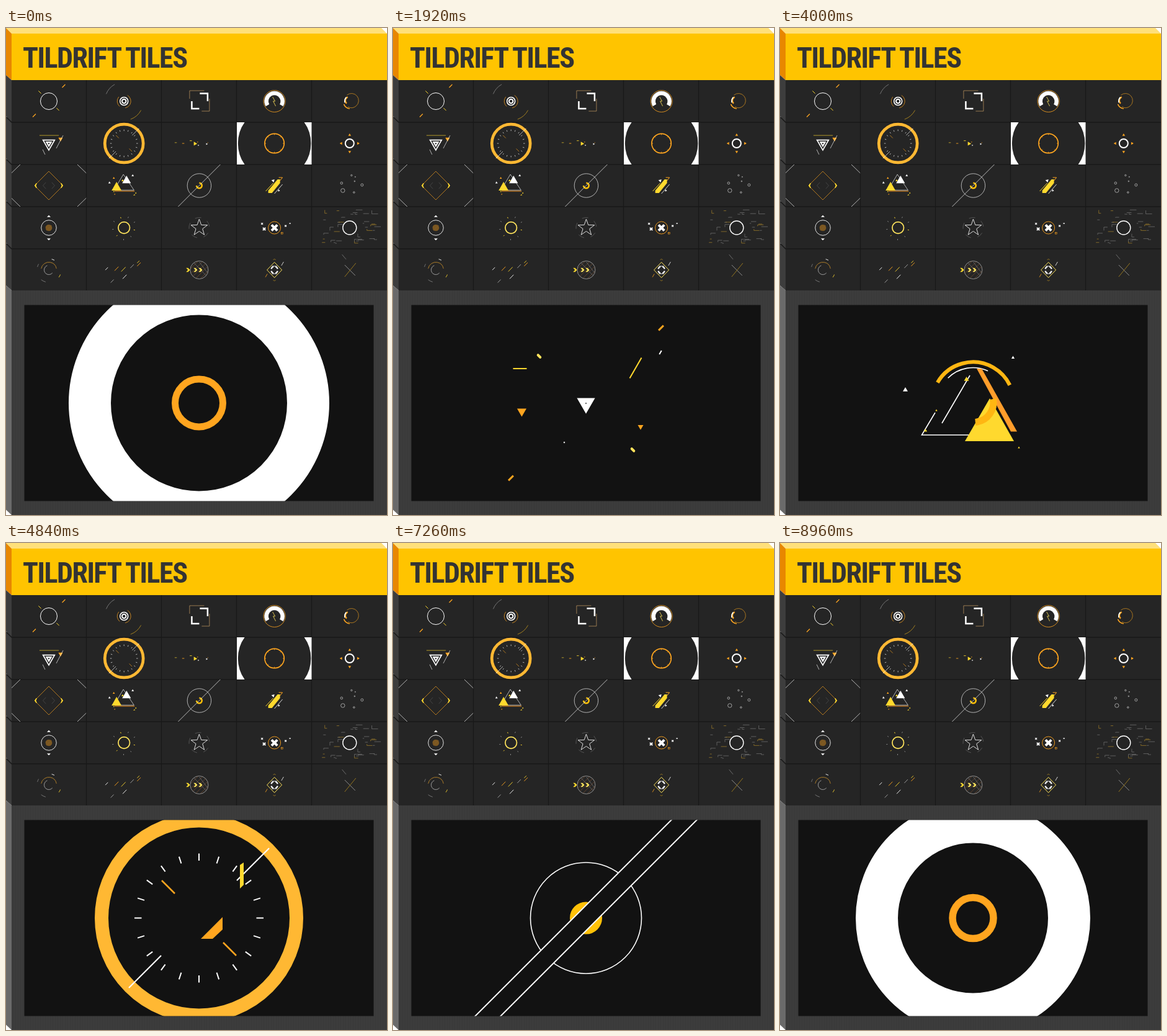
An HTML page with a canvas for the animation above (8.98 s loop, 614x785 px).

```html
<!DOCTYPE html>
<html lang="en">
<head>
<meta charset="utf-8">
<title>Tildrift Tiles</title>
<style>
html, body { margin: 0; width: 100%; height: 100%; overflow: hidden; background: #fff; }
canvas { position: absolute; left: 0; top: 0; display: block; }
h1 {
  position: absolute; left: 27px; top: 25px; margin: 0; color: #333; white-space: nowrap;
  font: 700 46px/46px "Roboto Condensed", Roboto, "Open Sans", sans-serif;
  font-stretch: 75%; letter-spacing: -1.5px;
}
</style>
</head>
<body>
<canvas id="stage" width="614" height="785"></canvas>
<h1>TILDRIFT TILES</h1>
<script>
const LOOP = 8980, MINI = 0.215;
const W = '#fff', Y = '#ffd92e', O = '#ffa51f', AMBER = '#ffb833', PALE = '#ffe45c', GREY = '#8a8a8a';
const PANEL = '#121212', CELL = '#252525';
const view = document.getElementById('stage').getContext('2d');
let g = view, bg = PANEL, thin = 0;

// timing
const prog = (t, a, b) => Math.min(1, Math.max(0, (t - a) / (b - a)));
const out = x => 1 - (1 - x) ** 3;
const soft = x => x * x * (3 - 2 * x);
const lerp = (a, b, p) => a + (b - a) * p;
const mix = (a, b, p) => a.map((v, i) => lerp(v, b[i], p));
const rad = d => d * Math.PI / 180;

// shapes
function trace(pts) {
  g.beginPath();
  for (let i = 0; i < pts.length; i += 2) g.lineTo(pts[i], pts[i + 1]);
}
function line(col, w, ...pts) {
  if (w <= 0) return;
  g.strokeStyle = col; g.lineWidth = Math.max(w, thin);
  trace(pts); g.stroke();
}
function poly(col, ...pts) {
  g.fillStyle = col;
  trace(pts); g.fill();
}
function arc(col, w, r, a = 0, b = 360, x = 0, y = 0) {
  if (r <= 0 || w <= 0 || b <= a) return;
  g.strokeStyle = col; g.lineWidth = Math.max(w, thin);
  g.beginPath(); g.arc(x, y, r, rad(a), rad(b)); g.stroke();
}
function tri(col, x, y, r, dir = -90) {
  const pts = [];
  for (let i = 0; i < 3; i++) {
    const a = rad(dir + i * 120);
    pts.push(x + r * Math.cos(a), y + r * Math.sin(a));
  }
  poly(col, ...pts);
}
function dash(col, w, x, y, len, deg = 0) {
  const dx = Math.cos(rad(deg)) * len / 2, dy = Math.sin(rad(deg)) * len / 2;
  line(col, w, x - dx, y - dy, x + dx, y + dy);
}
function tick(col, w, deg, r0, r1) {
  const c = Math.cos(rad(deg)), s = Math.sin(rad(deg));
  line(col, w, c * r0, s * r0, c * r1, s * r1);
}
function hatch(col, r, w, step) {
  if (r <= 0 || w <= 0) return;
  g.save();
  g.beginPath(); g.arc(0, 0, r, 0, 7); g.clip();
  const n = Math.ceil(2 * r / step);
  for (let i = -n; i <= n; i++) line(col, w, i * step - r, r, i * step + r, -r);
  g.restore();
}
function scaled(k, fn) {
  if (k <= 0) return;
  g.save(); g.scale(k, k); fn(); g.restore();
}

// scenes, drawn round their middle
function rings(t) {
  const u = t > 5000 ? t - LOOP : t;
  const R = 210 + 1.05 * u;
  if (R > 0 && R < 400) {
    const w = Math.min(68, R);
    arc(W, w, R - w / 2);
  }
  let r = u < 150 ? 38.5 + 0.275 * u : 79.75 + 25 * (1 - Math.exp(-0.011 * (u - 150)));
  const k = 1 - prog(u, 1250, 1700) ** 2, w = Math.max(4, 11 - 0.025 * u) * k;
  r *= k;
  arc(O, w, r);
  const len = 10 * prog(u, 40, 120) * k;
  for (let i = 0; i < 8; i++) tick(O, 4 * k, i * 45 + prog(u, 200, 1400) * 90, r - len, r);
}

const sparks = [
  [O, 3, 121, -121, 11, -45], [O, 3, -121, 121, 11, -45], [W, 2, 120, -81.5, 7, -60],
  [Y, 2, 80, -56.5, 38, -60], [Y, 2, -106.5, -55.5, 22, 0], [W, 2, -35, 63.5, 2, 45],
  [PALE, 4, -75.5, -75.5, 5, 45], [PALE, 4, 75.5, 75.5, 5, 45]
];
function target(t) {
  const far = out(prog(t, 1780, 1920)) + 0.1 * out(prog(t, 1920, 2300));
  const size = 1 - prog(t, 2000, 2450);
  for (const [col, w, x, y, len, deg] of sparks) {
    g.lineCap = w > 3 ? 'round' : 'butt';
    dash(col, w * Math.min(1, size * 3), x * far, y * far, len * size, deg);
  }
  g.lineCap = 'butt';
  tri(O, -103.5 * far, 13.3 * far, 8.7 * size, 90);
  const grow = soft(prog(t, 2050, 2450)), k = 1 - prog(t, 3050, 3450) ** 2;
  tri(O, lerp(88 * far, 88, grow), lerp(38 * far, -33, grow), lerp(5.2, 19, grow) * k, 90);
  const R = 58 * out(prog(t, 1874, 2300)) * k;
  tri(W, 0, 0.5, R, 90);
  tri(bg, 0, 0.5, 42 * out(prog(t, 1915, 2350)) * k, 90);
  tri(W, 0, 0.5, 29 * out(prog(t, 2120, 2480)) * k, 90);
  tri(bg, 0, 0.5, 9 * prog(t, 2300, 2600) * k, 90);
  const p = out(prog(t, 2200, 2600)) - soft(prog(t, 2900, 3350));
  if (p > 0) {
    line(Y, 2, -70, -60, -70 + 145 * p, -60);
    line(W, 2, 107, -60, 107 - 51 * p, -60 + 97 * p);
    line(W, 2, -46, 46, -46 + 18 * p, 46 + 38 * p);
  }
}

const chips = [[W, -109, -21, 4.6], [W, 64.5, -73, 3], [Y, -10.5, -38, 4.6],
  [Y, -76.5, 44.5, 3], [Y, -59, 12, 2], [Y, 74, 72, 2]];
function peaks(t) {
  const p = soft(prog(t, 4040, 4330)), q = 1 - p;
  const k = out(prog(t, 3560, 3950)) * (1 - prog(t, 4450, 4620) ** 2);
  scaled(k, () => {
    arc('#ffb612', 6, 66, -150, -150 + 124 * q);
    arc(W, 1.6, 57, -135, -135 + 70 * q);
    line(W, 1.6, ...mix([-61, 15.5, -82.5, 51.5, -7, 51.5], [-5, -84, -75, 34, 75, 34], p));
    line(W, 1.6, ...mix([-5, -44.5, -50, 32.5], [-5, -84, 75, 34], p));
    poly('#ff9d2b', ...mix([6, -55.5, 14, -55.5, 71, 46, 61, 46], [-70, 44, -70, 40, 79, 40, 79, 44], p));
    poly(Y, ...mix([-13, 61.5, 66, 61.5, 27, -7.5], [-93, 37, -19, 37, -56, -28], p));
    arc('#ffb612', 11, 32, -10, -10 + 95 * q, 1, -1);
    tri(W, 19, -36, 38 * p);
    for (const [col, x, y, r] of chips) tri(col, x, y, r * (1 + 1.2 * p));
  });
}

function dial(t) {
  const leave = prog(t, 5130, 5400), k = 1 - leave;
  const r = 157 * out(prog(t, 4620, 4840)) - 13 * soft(prog(t, 4840, 4960));
  arc(AMBER, 22, r + 340 * leave ** 2);
  const p = out(prog(t, 4680, 4820)) * k;
  for (let i = 0; i < 20; i++) tick(W, 2 * Math.min(1, p * 2), i * 18, 104 - 11.5 * p, 104);
  for (const s of [1, -1]) {
    if (p <= 0) continue;
    line(W, 2.2, 113 * s, -112.5 * s, (113 - 52 * p) * s, (-112.5 + 52 * p) * s);
    line(O, 2.5, 39 * s, 39.5 * s, (39 + 21 * p) * s, (39.5 + 21 * p) * s);
  }
  const enter = prog(t, 4720, 4840), go = prog(t, 4840, 4940);
  if (enter > 0 && go < 1) {
    const slab = (col, pts) => {
      const end = pts.map((v, i) => i % 2 ? -80 : 80);
      poly(col, ...mix(pts.map(v => v * enter), end, go));
    };
    slab(Y, [66, -85.5, 72, -89.5, 72, -53.5, 66, -47.5]);
    slab(O, [38, -1.5, 38, 18.5, 22, 33.5, 3, 33.5]);
  }
}

function drift(t) {
  const p = out(prog(t, 5420, 5750)) * (1 - soft(prog(t, 5850, 6120)));
  const back = soft(prog(t, 5800, 6200)), fade = 1 - prog(t, 6200, 6280);
  dash(Y, 2 * fade, lerp(-176 * out(prog(t, 5420, 5750)), -38, back), -5.5, 16 * fade);
  if (p <= 0) return;
  dash(O, 4, -120 * p, 0, 16 * p);
  dash(Y, 4, -63 * p, -20 * p, 16 * p);
  tri(Y, -32 * p, 2, 17 * p, 0);
  tri(W, -6 * p, 14 * p, 6 * p, 0);
  tri(O, -12 * p, -10 * p, 5 * p, 0);
  tri(W, 56 * p, 5 * p, 8 * p, 0);
  dash(O, 4, 64 * p, -5 * p, 5 * p);
}

function arrows(t) {
  const p = out(prog(t, 6205, 6520));
  const k = out(prog(t, 6080, 6195)) * (1 - prog(t, 6750, 6960) ** 2);
  scaled(k, () => {
    arc(W, lerp(6, 4, p), lerp(26, 57, p));
    hatch(bg, lerp(26, 57, p) + 5, 3.4 * (1 - p), 11);
    hatch(O, 25 * out(prog(t, 6330, 6600)), 4, 10);
    const h = lerp(41.7, 14, p), b = lerp(20.7, 80, p);
    for (const s of [1, -1]) poly(W, -h, b * s, h, b * s, 0, (b + h) * s);
  });
}

function slash(t) {
  const k = out(prog(t, 6860, 7100)), fill = prog(t, 7150, 7250);
  arc(W, 1.6, 89.5 * k);
  const w = lerp(12, 26, fill);
  arc('#ffc107', w * k, (26 - w / 2) * k, -90, 180 + 90 * fill);
  const d = 0.126 * Math.max(0, t - 7145) + 0.0008 * Math.max(0, t - 7260) ** 2;
  const len = 340 * out(prog(t, 6950, 7140));
  g.save();
  g.rotate(-Math.PI / 4);
  g.fillStyle = bg;
  g.fillRect(-len, -d, 2 * len, 2 * d);
  line(W, 2, -len, -d, len, -d);
  if (d) line(W, 2, -len, d, len, d);
  g.restore();
}

function rhomb(t) {
  const k = out(prog(t, 7520, 7800)) * (1 - prog(t, 8380, 8660) ** 2);
  scaled(k, () => {
    line(O, 2.4, 0, -107, 107, 0, 0, 107, -107, 0, 0, -107);
    for (const s of [1, -1]) {
      poly(Y, 88 * s, -17, 96 * s, -17, 107 * s, 0, 96 * s, 17, 88 * s, 17, 96 * s, 0);
      line('#555', 3, 22 * s, -24, 44 * s, 0, 22 * s, 24);
    }
  });
  const p = out(prog(t, 7600, 7800)) - soft(prog(t, 7880, 8090));
  if (p <= 0) return;
  for (const x of [1, -1]) for (const y of [1, -1])
    line(W, 2.4, 281 * x, 93 * y, (281 - 67 * p) * x, (93 + 65 * p) * y);
}

// small tiles
const mini = (scene, t) => () => {
  thin = 3;
  scaled(MINI, () => scene(t));
  thin = 0;
};
const cross = (x, y, r, w) => { dash(W, w, x, y, 2 * r, 45); dash(W, w, x, y, 2 * r, -45); };
const chevron = (col, x, h) =>
  poly(col, x - h, -h, x, -h, x + h, 0, x, h, x - h, h, x, 0);
function random(seed) {
  return () => (seed = seed * 16807 % 2147483647) / 2147483647;
}

const tiles = [
  () => {
    arc(W, 1, 13.5);
    dash(O, 1.2, 24, -24.5, 7, -45); dash(O, 1.2, -23.5, 23, 7, -45);
    dash(Y, 1, -14.5, -14.5, 6, 45); dash(Y, 1, 14.5, 13, 6, 45);
  },
  () => {
    arc(W, 1.6, 6.5); arc(W, 2, 3.2); arc(O, 0.7, 11, -60, 80); arc(O, 0.7, 11, 130, 220);
    arc(GREY, 0.8, 31, 202, 241); arc('#b08a20', 0.9, 31, 28, 70);
  },
  () => {
    line(W, 2.5, 1, -12.5, 13.5, -12.5, 13.5, 0); line(W, 2.5, -12, 0, -12, 12, 0, 12);
    line('#c9a064', 0.7, -15.5, -4, -15.5, -17, 8, -17); line('#c9a064', 0.7, 16.5, -4, 16.5, 16, 4, 16);
  },
  () => {
    arc(O, 0.8, 17.5); arc(W, 6.5, 13, 150, 390);
    line(PALE, 0.8, -3, -7, 1, 0, -2, 0, 2, 8);
  },
  () => {
    arc('#c98a20', 0.8, 11.5, -130, 120, 3, -1);
    arc(O, 2.5, 6, 130, 250, -1, -1); arc(W, 1.6, 9, 165, 225, 1, 0); arc(O, 1.6, 11, 95, 160, 1, 1);
  },
  mini(target, 2700),
  mini(dial, 4960),
  mini(drift, 5780),
  mini(rings, 125),
  () => {
    arc(W, 2, 7);
    for (let i = 0; i < 4; i++) tri(O, 13.5 * Math.cos(rad(i * 90)), 13.5 * Math.sin(rad(i * 90)), 2.6, i * 90);
  },
  mini(rhomb, 7820),
  () => {
    mini(peaks, 4400)();
    tri(O, -16.5, -12, 2); tri(W, 14, -16, 2.2); tri(Y, 19, 12, 1.4); tri(O, -15, 14, 1.2); tri(Y, 17, 15, 1.2);
  },
  mini(slash, 7142),
  () => {
    poly(Y, -10, 8, -10, 12, -4, 12, 9, -4, 9, -10, 5, -10);
    line(Y, 1, -14, 9, -2, -4); line(W, 0.8, 0, 13, 13, -2);
    tri(W, -2, -8, 3, -45); line(O, 1, 7, -13, 13, -13, 9, -8); tri(W, 7, 8, 2, 135);
  },
  () => {
    const dots = [[-11, 8, 3.2], [-13, -4, 1.8], [3, -16.5, 1.2], [20, -1, 2], [7, 11, 1.3], [8, -7, 0.8], [9, -14, 0.6]];
    for (const [x, y, r] of dots) arc('#bbb', 0.8, r, 0, 360, x, y);
  },
  mini(arrows, 6650),
  () => {
    arc(PALE, 1.7, 9.3);
    for (let i = 0; i < 9; i++) tick(i % 3 ? GREY : Y, 1, i * 40 + 12, 16 + i % 3, 18 + i % 3);
  },
  () => {
    const pts = [];
    for (let i = 0; i < 11; i++) {
      const a = rad(i * 36 - 90), r = i % 2 ? 5.6 : 14;
      pts.push(r * Math.cos(a), r * Math.sin(a));
    }
    line('#ddd', 1, ...pts);
    for (let i = 0; i < 5; i++) arc('#666', 0.7, 16.5, i * 72 + 30, i * 72 + 65);
  },
  () => {
    arc(O, 0.9, 10); cross(0, 0, 6.5, 4);
    cross(-20, -6.5, 2, 1.3); cross(-16.5, 2, 3, 2); cross(18, -3, 1.8, 1.3); cross(25, -7, 1.4, 1);
    g.strokeStyle = O; g.lineWidth = 0.7; g.strokeRect(11, 7.5, 2.5, 2.5);
  },
  () => {
    arc(W, 1.4, 11);
    const rnd = random(4711);
    for (let i = 0; i < 46; i++) {
      const x = rnd() * 86 - 45, y = rnd() * 56 - 29, a = rnd() * 9 + 2, b = (rnd() - 0.5) * 12;
      if (Math.hypot(x, y) < 18) continue;
      const col = rnd() < 0.4 ? '#a8842c' : '#777';
      if (rnd() < 0.5) line(col, 0.7, x, y, x + a, y);
      else line(col, 0.7, x + a, y, x, y, x, y + b);
    }
  },
  () => {
    arc('#b9852a', 0.9, 12.5, 190, 350); arc('#aaa', 0.9, 7.5, 40, 250);
    arc(Y, 0.9, 20, 22, 36); arc(GREY, 0.8, 20, 105, 128); arc(GREY, 0.8, 19, 195, 210); arc(W, 0.9, 18, -75, -60);
  },
  () => {
    const bars = [[-28, -2, 6], [-19, 18, 7], [-12, -2, 9], [-1, -1, 10], [1, 11, 9], [13, -6, 8], [24, -9, 8], [23, -13, 5]];
    bars.forEach(([x, y, n], i) => dash([W, '#aaa', O, Y][i % 4], 0.9, x, y, n, -46));
  },
  () => {
    arc('#aaa', 0.8, 14.5);
    hatch('#8c5a35', 14, 0.6, 8);
    line('#888', 0.6, 0, -13, 13, 4); line('#888', 0.6, -8, -11, 11, 9);
    chevron(Y, -18, 3.2); chevron(PALE, -6, 3.2); chevron(PALE, 2, 3.2);
  },
  () => {
    line(PALE, 1, 0, -12.5, 12, 0, 0, 12.5, -12, 0, 0, -12.5);
    for (let i = 0; i < 4; i++) arc(W, 2.2, 5.5, i * 90 + 18, i * 90 + 72);
    line(W, 1.1, -4, -6, 4, -6); line(W, 1.1, -4, 6, 4, 6);
    line('#b08a20', 0.8, -2, -16, 0, -18, 2, -16); line('#b08a20', 0.8, -2, 16, 0, 18, 2, 16);
    dash(W, 0.8, 13, -10, 7, -60); dash(O, 0.8, -13, 9, 6, -60);
  },
  () => {
    line('#bbb', 0.7, -8, -8, 9, 9); line('#b08a20', 0.8, -8, 11, 10, -11);
    dash(GREY, 0.7, -9, -21, 10, 50);
  }
];

function frame() {
  const box = (col, x, y, w, h) => { g.fillStyle = col; g.fillRect(x, y, w, h); };
  poly('#ffe07a', 0, 0, 605, 0, 614, 9, 9, 9);
  poly('#e88700', 0, 0, 9, 9, 9, 84, 0, 76);
  poly('#3d3d3d', 0, 76, 9, 84, 9, 423, 0, 415);
  poly('#6a6a6a', 0, 415, 9, 423, 9, 785, 0, 776.5);
  box('#ffc400', 9, 9, 605, 75);
  box(CELL, 9, 84, 605, 339);
  box('#3c3c3c', 9, 423, 605, 362);
  for (let x = 11; x < 614; x += 4) box('#393939', x, 423, 1, 362);
  for (let i = 1; i < 5; i++) {
    const y = 84 + i * 68;
    line('#181818', 1.5, 0, y - 9, 9, y, 614, y);
    line('#ddd', 1, 0, y - 9.5, 1, y - 8.5);
    line('#181818', 1.2, 8.5 + i * 121, 84, 8.5 + i * 121, 423);
  }
  bg = CELL;
  tiles.forEach((draw, i) => {
    const col = i % 5, row = Math.floor(i / 5);
    g.save();
    g.beginPath();
    g.rect(9 + col * 121, 84 + row * 68, 120.5, 68);
    g.clip();
    g.translate(69 + col * 121.2, 118 + row * 68);
    draw();
    g.restore();
  });
  box(PANEL, 29.5, 446.5, 563, 316);
}

const still = document.createElement('canvas');
still.width = 614; still.height = 785;
g = still.getContext('2d');
frame();
g = view;

const show = [
  [target, 1780, 3450], [peaks, 3560, 4620], [dial, 4620, 5400], [drift, 5420, 6280],
  [arrows, 6080, 6960], [slash, 6860, 7900], [rhomb, 7520, 8660], [rings, 8780, LOOP], [rings, 0, 1700]
];
const begin = performance.now();
function play() {
  const t = Math.floor((performance.now() - begin) % LOOP / 20) * 20;
  bg = PANEL;
  g.clearRect(0, 0, 614, 785);
  g.drawImage(still, 0, 0);
  g.save();
  g.beginPath(); g.rect(29.5, 446.5, 563, 316); g.clip();
  g.translate(311, 604.5);
  for (const [scene, a, b] of show) if (t >= a && t < b) scene(t);
  g.restore();
  requestAnimationFrame(play);
}
play();
</script>
</body>
</html>
```
